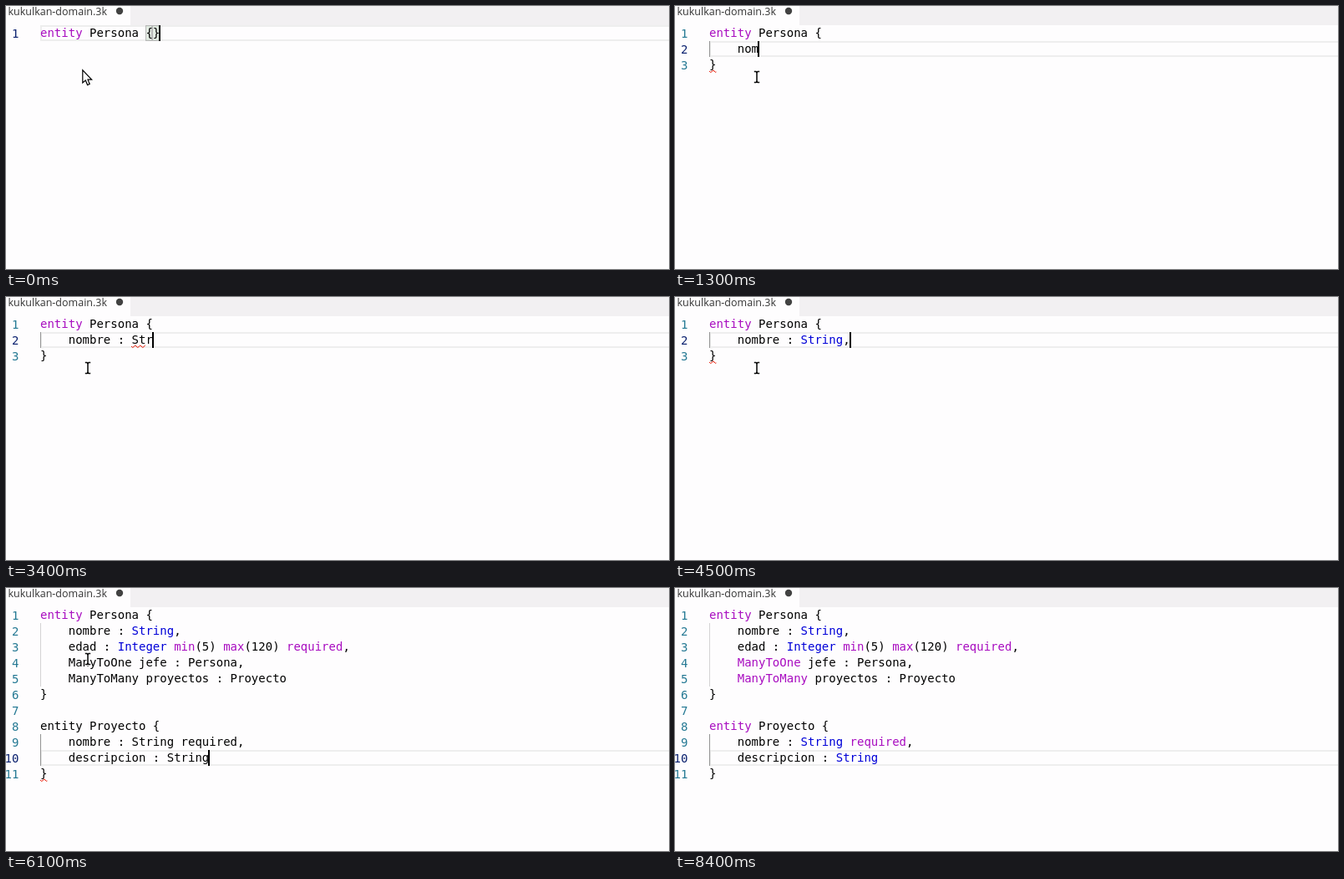
Write an HTML page with a canvas that moves like this. It is 794 px wide and 315 px high and loops after 8.5 s.

```html
<!DOCTYPE html>
<html lang="es">
<head>
<meta charset="utf-8">
<title>Editor</title>
<style>
html, body { margin: 0; width: 100%; height: 100%; overflow: hidden; background: #fefdfe; }
canvas { display: block; }
</style>
</head>
<body>
<canvas id="stage" width="794" height="315"></canvas>
<script>
const ctx = document.getElementById('stage').getContext('2d');
const LOOP = 8500, LEFT = 41, TOP = 23, ROW = 19, CHAR = 8.428;
const CODE_FONT = '14px "DejaVu Sans Mono", monospace';
const DARK = '#939393', LIGHT = '#d3d3d3';
const KEYWORD = '#a80cc0', TYPE = '#0000d8';
const TOKENS = /\b(entity|min|max|required|ManyTo\w+|String|Integer)\b/;

const rowTop = row => TOP + row * ROW;
const colX = col => LEFT + col * CHAR;

const persona = (...body) => ['entity Persona {', ...body.map(s => '    ' + s), '}'];
const typed = s => ({ lines: persona(s), caret: true });
const errorAt = (row, col, length) => ({ error: { row, col, length } });
const braceError = row => errorAt(row, 0, 1);
const wordError = length => errorAt(1, 13, length);
const on = { caret: true }, off = { caret: false };
const mouse = (kind, x, y) => ({ pointer: { kind, x, y } });

const finished = [
  ...persona(
    'nombre : String,',
    'edad : Integer min(5) max(120) required,',
    'ManyToOne jefe : Persona,',
    'ManyToMany proyectos : Proyecto'),
  '',
  'entity Proyecto {',
  '    nombre : String required,',
  '    descripcion : String',
  '}'
];

// Each step changes part of the editor state from its time on.
const steps = [
  [0, { lines: ['entity Persona {}'], row: 0, col: null, caret: true, plainFrom: 99,
        brackets: [[0, 15], [0, 16]], guides: [], error: null, ...mouse('arrow', 91, 76) }],
  [100, mouse('beam', 98, 85)],
  [300, { col: 16 }],
  [500, { ...typed(''), row: 1, col: null, brackets: [[0, 15], [2, 0]] }],
  [800, { ...typed('n'), guides: [[1, 1, DARK]] }],
  [900, { brackets: [] }],
  [1100, braceError(2)],
  [1200, typed('no')],
  [1300, typed('nom')],
  [1500, typed('nomb')],
  [1700, typed('nombr')],
  [1800, typed('nombre ')],
  [2300, off],
  [2400, typed('nombre :')],
  [2700, typed('nombre : ')],
  [2900, { ...typed('nombre : S'), ...wordError(1) }],
  [3200, typed('nombre : St')],
  [3300, wordError(2)],
  [3400, typed('nombre : Str')],
  [3500, { ...typed('nombre : Stri'), ...wordError(4) }],
  [3700, typed('nombre : Strin')],
  [3800, { ...typed('nombre : String'), plainFrom: 1 }],
  [3900, { plainFrom: 99, error: null }],
  [4300, off],
  [4500, { ...typed('nombre : String,'), ...braceError(2) }],
  [5000, { lines: persona('nombre : String,', ''), row: 2, guides: [[1, 2, DARK]], ...braceError(3) }],
  [5500, off],
  [5900, on],
  [6100, { lines: finished, row: 9, plainFrom: 3, ...braceError(10),
           guides: [[1, 4, LIGHT], [8, 9, DARK]] }],
  [6200, { plainFrom: 99, error: null }],
  [6600, off],
  [7200, on],
  [7300, mouse('beam', 99, 86)],
  [7600, mouse('beam', 95, 76)],
  [7700, { ...off, ...mouse('beam', 83, 52) }],
  [7800, mouse('beam', 62, 23)],
  [7900, { pointer: null }],
  [8200, on],
  [8400, off]
];

function stateAt(time) {
  const state = {};
  for (const [start, change] of steps) if (start <= time) Object.assign(state, change);
  return state;
}

function rect(color, x, y, w, h) {
  ctx.fillStyle = color;
  ctx.fillRect(x, y, w, h);
}

function text(color, s, x, y) {
  ctx.fillStyle = color;
  ctx.fillText(s, x, y);
}

function polyline(points, color, width) {
  ctx.beginPath();
  for (const [x, y] of points) ctx.lineTo(x, y);
  ctx.strokeStyle = color;
  ctx.lineWidth = width;
  ctx.stroke();
}

function drawTab() {
  rect('#f2f0f2', 149, 0, 645, TOP);
  ctx.font = '12.5px "Open Sans", "Noto Sans", sans-serif';
  text('#333333', 'kukulkan-domain.3k', 2.5, 11);
  ctx.fillStyle = '#424242';
  ctx.beginPath();
  ctx.arc(136, 6, 4.2, 0, 7);
  ctx.fill();
}

function drawLine(line, row, plain) {
  let col = 0;
  for (const part of line.split(TOKENS)) {
    const color = plain || !TOKENS.test(part) ? '#000000'
      : /String|Integer/.test(part) ? TYPE : KEYWORD;
    text(color, part, colX(col), rowTop(row) + 14);
    col += part.length;
  }
}

function drawBracket([row, col]) {
  const x = Math.floor(colX(col)), w = Math.floor(colX(col + 1)) - x, y = rowTop(row);
  rect('rgba(0,100,0,0.1)', x, y, w, ROW);
  ctx.strokeStyle = '#b9b9b9';
  ctx.lineWidth = 1;
  ctx.strokeRect(x + 0.5, y + 0.5, w - 1, ROW - 1);
}

function drawError({ row, col, length }) {
  const x = Math.floor(colX(col)), bottom = rowTop(row + 1), width = length * CHAR;
  ctx.save();
  ctx.beginPath();
  ctx.rect(x, bottom - 4, width, 5);
  ctx.clip();
  const points = [];
  for (let dx = -1.2; dx < width + 6; dx += 3)
    points.push([x + dx, bottom - (points.length % 2 ? 0.5 : 3)]);
  polyline(points, '#e51400', 1);
  ctx.restore();
}

function drawPointer({ kind, x, y }) {
  ctx.save();
  ctx.translate(x, y);
  if (kind === 'beam') {
    for (const [color, width] of [['#ffffff', 3.4], ['#000000', 1.5]]) {
      polyline([[-3.2, -6.5], [-1, -6.5], [0, -5.5], [1, -6.5], [3.2, -6.5]], color, width);
      polyline([[0, -6], [0, 6]], color, width);
      polyline([[-3.2, 6.5], [-1, 6.5], [0, 5.5], [1, 6.5], [3.2, 6.5]], color, width);
    }
  } else {
    ctx.beginPath();
    for (const p of [[0.8, 0.8], [0.8, 16], [4.3, 13], [6.6, 18.6], [9.2, 17.5], [7, 12.2], [11.6, 12.2]])
      ctx.lineTo(...p);
    ctx.closePath();
    ctx.fillStyle = '#ffffff';
    ctx.fill();
    ctx.strokeStyle = '#000000';
    ctx.lineWidth = 1.2;
    ctx.stroke();
  }
  ctx.restore();
}

function draw(state) {
  rect('#fefdfe', 0, 0, 794, 315);
  drawTab();
  ctx.strokeStyle = '#eeeeee';
  ctx.lineWidth = 2;
  ctx.strokeRect(LEFT + 1, rowTop(state.row) + 1, 800, ROW - 2);
  for (const [from, to, color] of state.guides)
    rect(color, LEFT, rowTop(from), 1, (to - from + 1) * ROW);
  state.brackets.forEach(drawBracket);

  ctx.font = CODE_FONT;
  state.lines.forEach((line, row) => {
    const number = String(row + 1);
    text(row === state.row ? '#0b216f' : '#237893', number,
      15.4 - number.length * CHAR, rowTop(row) + 15);
    drawLine(line, row, row >= state.plainFrom);
  });

  if (state.error) drawError(state.error);
  if (state.caret) {
    const col = state.col ?? state.lines[state.row].length;
    rect('#000000', Math.floor(colX(col) - 0.45), rowTop(state.row), 2, ROW);
  }
  if (state.pointer) drawPointer(state.pointer);
}

const began = performance.now();
function tick() {
  draw(stateAt((performance.now() - began) % LOOP));
  requestAnimationFrame(tick);
}
tick();
</script>
</body>
</html>
```
